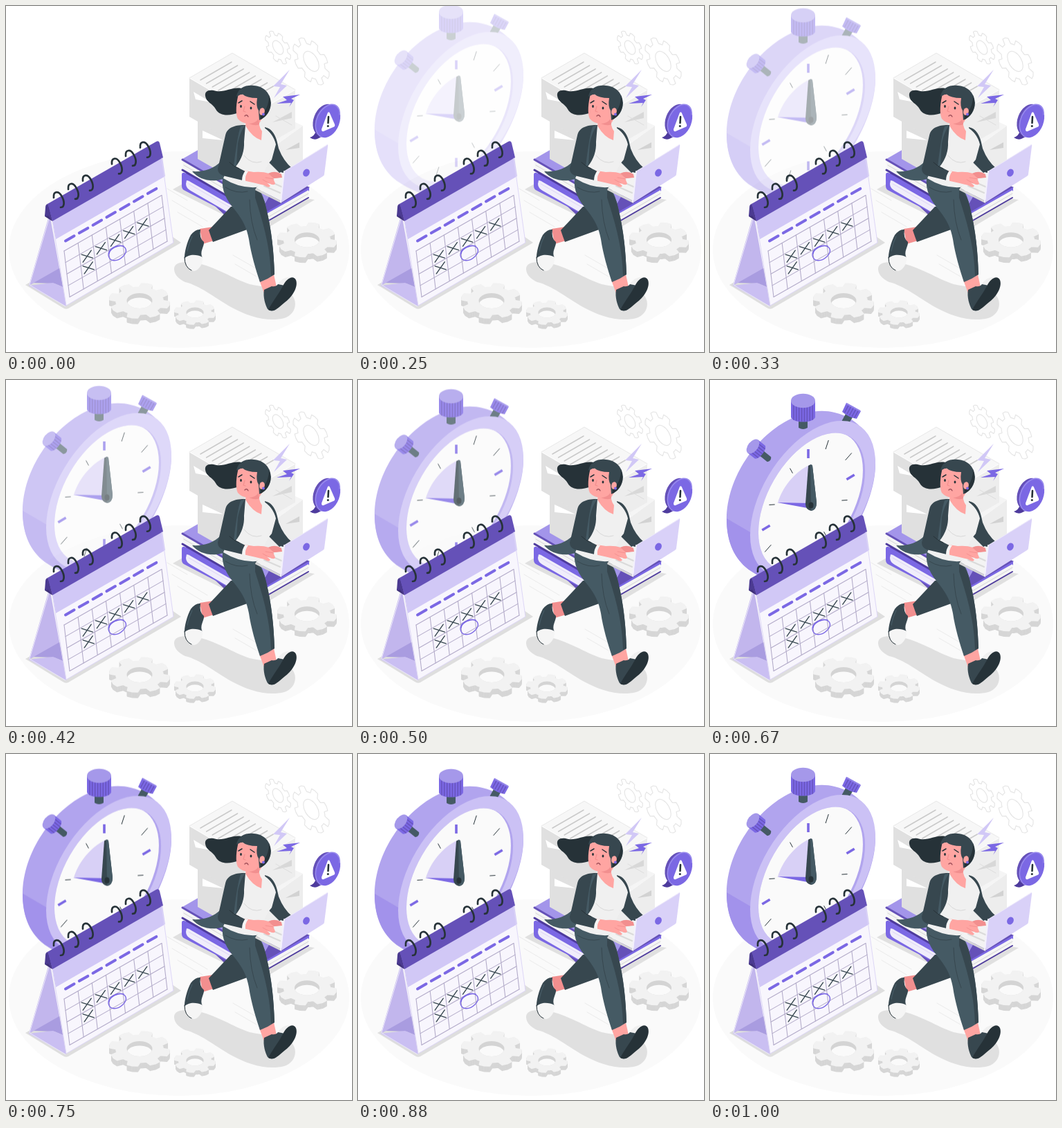
An HTML page with a canvas for the animation above (1.04 s loop, 500 px wide and 500 px high).

```html
<!DOCTYPE html>
<html lang="en">
<head>
<meta charset="utf-8">
<title>Deadline</title>
<style>
html, body { margin: 0; width: 100%; height: 100%; overflow: hidden; background: #fff; }
canvas { display: block; width: 500px; height: 500px; }
</style>
</head>
<body>
<canvas id="stage"></canvas>
<script>
const SIZE = 500, LOOP = 1040;
const DPR = window.devicePixelRatio || 1;
const INK = '#263238', SLATE = '#37474f', STEEL = '#455a64';
const VIOLET = '#7b68e4', DEEP = '#6551b8', LILAC = '#d1c8f6';
const SKIN = '#ffa5a2', BLUSH = '#f28f8f';
let c;

function layer(canvas, draw) {
  canvas.width = canvas.height = SIZE * DPR;
  c = canvas.getContext('2d');
  c.scale(DPR, DPR);
  c.lineCap = c.lineJoin = 'round';
  if (draw) draw();
  return canvas;
}
const makeLayer = draw => layer(document.createElement('canvas'), draw);

function fill(d, color) {
  c.fillStyle = color;
  c.fill(typeof d === 'string' ? new Path2D(d) : d);
}
function line(d, color, w = 1) {
  c.strokeStyle = color;
  c.lineWidth = w;
  c.stroke(typeof d === 'string' ? new Path2D(d) : d);
}
function clipped(shape, draw) {
  c.save();
  c.clip(shape);
  draw();
  c.restore();
}
function oval(x, y, rx, ry = rx, rot = 0) {
  const p = new Path2D();
  p.ellipse(x, y, rx, ry, rot, 0, 7);
  return p;
}
// Circle seen on an upright isometric wall; dir is the slope of the wall.
function wallDisc(x, y, r, dir, tall = 1) {
  const p = new Path2D(), q = new Path2D();
  q.arc(0, 0, r, 0, 7);
  p.addPath(q, new DOMMatrix([.866, .5 * dir, 0, tall, x, y]));
  return p;
}
function gearPath(x, y, m, R, r, n, rot) {
  const p = new Path2D(), s = Math.PI / n;
  for (let i = 0; i < n; i++) {
    for (const [k, q] of [[-.66, r], [-.45, R], [0, R * 1.02], [.45, R], [.66, r], [1, r]]) {
      const a = rot + (2 * i + k) * s;
      const u = q * Math.cos(a), v = q * Math.sin(a);
      p.lineTo(x + m[0] * u + m[2] * v, y + m[1] * u + m[3] * v);
    }
  }
  p.closePath();
  return p;
}
function floorGear(x, y, R, h) {
  const shape = dy => gearPath(x, y + dy, [1, 0, 0, .577], R - 1, R * .77, 8, .24);
  for (let dy = h; dy > 0; dy--) {
    fill(shape(dy), '#d6d6d6');
    line(shape(dy), '#d6d6d6', 2);
  }
  fill(shape(0), '#f2f2f2');
  line(shape(0), '#f2f2f2', 2);
  const hole = oval(x, y, R * .42, R * .25);
  fill(hole, '#d4d4d4');
  clipped(hole, () => fill(oval(x, y + h * .8, R * .42, R * .25), '#fafafa'));
}
function wallGear(x, y, R, hole) {
  line(gearPath(x, y, [.866, .5, 0, 1], R, R * .77, 8, .2), '#e6e6e6', 1.2);
  line(wallDisc(x, y, hole, 1), '#e6e6e6', 1.2);
}

function ground() {
  c.fillStyle = '#fff';
  c.fillRect(0, 0, SIZE, SIZE);
  fill(oval(250, 352, 246, 142), '#fafafa');
  wallGear(393, 60, 21, 9);
  wallGear(441, 80, 30, 13);
  line('M240 281L291 311M248 298L284 319M233 264L262 281M328 360L373 386M331 373L362 391', '#ebebeb');
}

function papers() {
  fill('M241 265L264 252L446 280L374 323Q367 327 357 323Z', '#e0e0e0');
  // lower book
  fill('M254 244L330 213L439 262L369 303L318 304Z', DEEP);
  fill('M254 243Q255 239 260 242L336 285Q361 297 374 299L438 262V267L375 305L372 315L324 301L257 266Q254 264 254 260Z', VIOLET);
  fill('M261 252Q264 252 268 255L331 291V304L267 267Q260 263 260 257Z', '#f0edfb');
  line('M264 257L329 294', '#ddd5f5');
  fill('M370 304L437 266V277L372 315Z', '#f5f5f5');
  line('M372 309L437 271', '#d4d4d4');
  line('M371 315L437 277', '#4e3b9d', 2);
  // upper book
  fill('M255 221L281 206L400 240L372 290Z', '#a395ea');
  fill('M255 222L372 290V299L340 286L256 237Z', '#f5f5f5');
  line('M257 230L350 284', '#d4d4d4');
  line('M255 222L360 283', DEEP, 3);
  line('M255 237L336 284', '#4e3b9d', 3);
  // lower pile
  fill('M277 164L368 217V273L277 221Z', '#e0e0e0');
  fill('M368 217L429 173V230L368 270Z', '#ededed');
  fill('M277 164L338 131L429 173L368 217Z', '#f5f5f5');
  fill('M284 180L314 194L284 191Z', '#fff');
  fill('M424 197L404 208L424 205Z', '#d2d2d2');
  // upper pile
  fill('M265 104L356 157V212L265 160Z', '#e0e0e0');
  fill('M356 157L418 121V177L356 212Z', '#ededed');
  fill('M327 68L418 121L356 157L265 104Z', '#f7f7f7');
  line('M265 104L356 157L418 121', '#fff');
  line('M265 104L327 68L418 121', '#e8e8e8');
  fill('M271 124L296 139L274 135Z', '#fff');
  fill('M413 153L385 168L413 162Z', '#d8d8d8');
  line('M390 159L413 172', '#dedede');
  for (let i = 0; i < 8; i++) {
    const x = 281 + i * 8.6, y = 107 + i * 5;
    line(`M${x} ${y}L${x + 45} ${y - 26}`, '#cacaca', 1.5);
  }
}

function knob(x, y, rot, w, h, ridges, stem) {
  c.save();
  c.translate(x, y);
  c.rotate(rot);
  const b = w * .5;
  fill(`M${-w * .37} ${h}V${stem - 2}Q0 ${stem + 2} ${w * .37} ${stem - 2}V${h}Z`, STEEL);
  fill(`M${-w} 0V${h}C${-w * .8} ${h + b} ${w * .8} ${h + b} ${w} ${h}V0Z`, VIOLET);
  for (let i = 1; i < ridges; i++) {
    const u = -1 + 2 * i / ridges, sag = Math.sqrt(1 - u * u) * b;
    line(`M${u * w} ${sag}V${h + sag * .7}`, DEEP, 1.3);
  }
  fill(oval(0, 0, w, w * .59), '#a598ea');
  c.restore();
}

function stopwatch() {
  fill('M24 202C24 140 68 79 117 56C138 45 162 42 180 47C216 55 239 86 239 122C239 185 180 286 110 296Q85 294 56 274C36 259 24 235 24 202Z', '#b1a4ee');
  fill('M24 200L60 221L100 294Q78 289 56 274C36 259 24 235 24 200Z', '#a292eb');
  c.lineCap = 'butt';
  knob(62, 96, -.9, 12, 13, 6, 32);
  fill('M196 49L206 54L200 64Q194 65 190 60Z', STEEL);
  fill('M197 33L218 45L212 56Q200 54 191 46Z', VIOLET);
  for (let i = 1; i < 6; i++) {
    const x = 197 + i * 3.5, y = 34 + i * 2;
    line(`M${x} ${y}l-6 11`, DEEP, 1.3);
  }
  line('M197 34L217 45', '#9283e8', 2);

  fill(wallDisc(148.5, 172, 104.5, -1, .96), '#cbc1f5');
  const rim = wallDisc(147, 176, 89, -1);
  fill(rim, '#b1a4ee');
  clipped(rim, () => fill(wallDisc(143, 175.5, 90, -1), '#fafafa'));
  for (let i = 0; i < 12; i++) {
    const major = i % 3 === 0, hour = i * Math.PI / 6;
    const a = hour - .1 * Math.sin(4 * hour), k = 1 + .06 * Math.sin(2 * hour);
    const at = r => `${142 + .866 * r * k * Math.sin(a)} ${177 - r * k * (.52 * Math.sin(a) + Math.cos(a))}`;
    line(`M${at(major ? 64 : 65)}L${at(major ? 77 : 76)}`, major ? VIOLET : INK, major ? 3.6 : 1);
  }
  c.lineCap = 'round';
  fill('M146 181L98 177C104 157 120 134 145 122Z', '#d8d0f6');
  fill('M97 177L144 178L146 186Z', VIOLET);
  fill('M142 124Q145 121 148 124L154 177Q154 188 146 189Q138 187 138 179Z', SLATE);
  fill('M145 122Q148 122 148 124L154 177Q154 188 146 189Z', STEEL);
  fill(oval(146, 181, 3.5, 4.5), INK);
  c.lineCap = 'butt';
  knob(134.5, 30, 0, 17.5, 24, 9, 41);
  c.lineCap = 'round';
}

function calendar() {
  fill('M28 403L66 382L240 333L253 342L90 437Q86 439 82 436Z', '#dedede');
  fill('M63 300L33 404L76 381L87 434Z', '#c2b6ed');
  fill('M40 400L77 379L82 406L70 401Z', '#a99ce0');
  fill('M33 404L68 400L82 406L87 434Z', '#cabff2');
  line('M64 301L34 403L86 434', '#ece8fb');
  fill('M61 285L56 304L67 311Z', '#3f3178');
  fill('M67 310L225 219L242 342L87 433Z', '#f8f6fd');
  fill('M67 310L226 219L230 246L72 337Z', LILAC);
  fill('M60 286L217 196Q221 194 222 198L227 219L67 311Z', DEEP);
  fill('M60 286Q57 287 57 291L56 304L61 303L67 311Z', '#4b3a91');
  line('M67 311L87 433L242 342L225 220', '#ddd6f6', 1);

  const at = (u, v) => [84 + 141 * u + 8 * v, 354 - 80.5 * u + 66.5 * v];
  const seg = (a, b) => `M${at(...a)}L${at(...b)}`;
  for (let i = 0; i <= 7; i++) line(seg([i / 7, 0], [i / 7, 1]), '#b3abc9', 1.1);
  for (let i = 0; i <= 4; i++) line(seg([0, i / 4], [1, i / 4]), '#b3abc9', 1.1);
  for (let i = 0; i < 7; i++) line(`M${86 + i * 19.8} ${339.5 - i * 11.4}l12.5 -7.2`, VIOLET, 4);
  for (const [col, row] of [[1, 1], [2, 1], [3, 1], [4, 1], [5, 1], [1, 2]]) {
    const [x, y] = at((col + .5) / 7, (row + .5) / 4);
    line(`M${x - 8} ${y - 2.5}L${x + 8} ${y + 2.5}M${x - 6} ${y + 8.5}L${x + 6} ${y - 8.5}`, SLATE, 1.4);
  }
  line('M170 347C159 344 148 351 148 360C149 370 161 370 169 362C178 353 172 345 162 347C154 349 149 354 149 358', VIOLET, 1.4);
  for (const x of [75, 96, 117, 159, 179, 200]) {
    c.save();
    c.translate(x, 281 - (x - 75) * .578);
    line('M-6 -4C-7 -14 1 -14 5 -7C10 1 10 10 4 10', INK, 2.7);
    c.restore();
  }
}

function badge() {
  fill('M448 180Q446 188 439 190Q446 195 452 191L460 187Z', '#4e3b9d');
  fill(oval(461, 165, 16.5, 24, .36), DEEP);
  fill(oval(465, 166, 17, 25, .36), VIOLET);
  line('M455 189C441 180 447 151 467 143C477 140 483 147 482 157', '#988aec', 1.5);
  fill('M465 154Q467 152 468 155L475 171Q476 174 473 175L459 181Q456 182 456 178Z', '#fff');
  line('M466 160L465.5 169', INK, 2.6);
  fill(oval(465.3, 173.5, 1.5), INK);
  fill('M410 92L386 116L396 117L387 133L406 115L397 113Z', LILAC);
  fill('M425 128L400 131L406 136L391 141L412 140L409 146L416 136L412 134Z', VIOLET);
}

function legs() {
  fill('M243 381C242 371 254 368 273 371C302 376 330 395 352 402C372 407 392 405 406 412C423 420 422 445 402 451C378 457 350 449 325 435C299 420 280 404 259 399Q244 392 243 381Z', '#e0e0e0');
  // rear leg
  fill('M280 322L300 319L304 338L284 344Z', BLUSH);
  fill('M325 290L293 324Q296 333 299 341L354 321L352 290Z', SLATE);
  fill('M281 323Q274 322 267 331C262 340 257 357 258 368C260 378 268 383 276 380L284 364C279 355 287 347 286 341Q279 336 281 323Z', SLATE);
  fill('M258 365C264 358 276 359 284 363C285 373 278 383 271 383C264 382 258 374 258 365Z', '#f5f5f5');
  line('M258 363Q258 378 268 382', INK, 1);
  line('M269 333Q264 343 262 354', STEEL, 1.3);
  // front leg
  fill('M366 396L387 388L391 406L373 415Z', SKIN);
  fill('M313 249C311 267 319 281 331 295C343 310 348 321 351 337C354 358 361 381 367 399Q378 395 388 388C387 355 384 325 376 292Q373 275 362 257Z', STEEL);
  fill('M360 260Q373 275 376 292C384 325 387 355 388 388L383 390C382 352 374 320 360 277Z', SLATE);
  line('M317 262Q333 272 349 268M352 280Q353 314 363 338', SLATE, 1);
  fill('M373 410C371 421 375 432 378 438Q384 443 391 438L409 398L393 402Q390 406 384 405Z', SLATE);
  fill('M393 402C398 393 407 391 413 392Q406 397 403 404Z', '#f0f0f0');
  fill('M419 396C423 407 412 422 402 429C394 436 387 443 379 439C386 426 394 416 400 405C405 394 415 388 419 396Z', INK);
}

function torso() {
  // coat tail and far arm
  fill('M311 224C300 236 284 240 269 239Q282 254 305 252L329 247L322 224Z', STEEL);
  fill('M374 175C387 178 391 190 394 206Q401 224 413 234L397 243L380 226Z', SLATE);
  fill('M345 170L370 174Q386 183 390 200L384 222Q370 237 370 261Q341 266 314 249L334 201Z', '#f0f0f0');
  fill('M348 160L366 160Q364 173 370 181L369 194Q356 190 346 173Z', SKIN);
  line('M344 216Q355 230 369 225', '#d8d8d8', 1);
  fill('M346 172C333 172 320 174 317 187C313 204 309 224 306 235Q306 242 313 245L342 252L346 239L332 232Q345 216 344 196Z', SLATE);
  fill('M346 172Q339 180 335 198L333 230L329 232Q334 189 339 174Z', STEEL);
  line('M323 226Q329 232 337 235', INK, 1);
  // laptop
  fill('M361 263L397 240L416 246L398 282Z', '#f3f3f3');
  fill('M361 263L398 282V285L360 266Z', '#d6d6d6');
  line('M373 260L396 270M382 254L400 262', '#dadada', 2);
  fill('M402 239L463 201Q466 199 465 203L460 243Q460 245 458 246L398 284Z', '#d9d1f8');
  line('M402 239L397 283', '#f3f0fd', 2);
  line('M402 239L464 201', '#eeeafb', 1);
  fill(oval(434, 241, 4.6, 5.8, .5), VIOLET);
  // hands
  fill('M345 238L358 240Q371 239 380 242Q392 239 398 246Q395 249 386 249L388 254Q391 259 384 258L377 255L382 260Q380 264 373 259Q361 256 343 252Z', SKIN);
  fill('M379 242Q389 237 398 243L399 248L387 249Z', BLUSH);
  fill('M346 238L350 239Q345 245 346 253L341 252Q341 244 346 238Z', '#f5f5f5');
  line('M375 248L387 250M371 251L380 256', BLUSH, .9);
}

function head() {
  fill('M343 120C330 115 318 125 304 123C293 120 287 123 288 130C289 139 299 141 303 149C309 160 324 159 336 154L340 136Z', INK);
  fill('M336 127C333 139 331 155 335 163Q341 170 351 170L365 171L373 158L369 133Z', SKIN);
  fill('M351 170Q360 170 365 163L366 171Q361 174 351 170Z', BLUSH);
  fill('M333 131C335 118 346 114 358 115C373 116 382 126 383 140C383 151 376 161 366 165L365 151Q361 145 363 133Q348 133 341 127Q337 129 333 131Z', SLATE);
  fill('M380 129C385 143 381 158 368 164L368 157Q380 149 380 129Z', INK);
  fill(oval(370, 152.5, 3.8, 5.4, .2), SKIN);
  fill(oval(372, 156.5, 2), VIOLET);
  fill(oval(339.5, 145, 1.4, 2), INK);
  fill(oval(354, 147.5, 1.4, 2), INK);
  line('M336 140L341 137M353 138L359 142', INK, 1.5);
  line('M345 145L343 152L346 153', BLUSH, 1.2);
  line('M345 159Q348 156 350 160', '#9d4d58', 1.3);
}

function foreground() {
  calendar();
  floorGear(193, 426, 44, 8);
  floorGear(273, 443, 30, 6);
  floorGear(435, 338, 43, 8);
  badge();
  legs();
  torso();
  head();
}

// Eased progress on the curve (.36, -.01, .5, 1.38).
function ease(t) {
  const cubic = (a, b, s) => 3 * a * s * (1 - s) ** 2 + 3 * b * s * s * (1 - s) + s ** 3;
  let lo = 0, hi = 1;
  for (let i = 0; i < 24; i++) {
    const mid = (lo + hi) / 2;
    if (cubic(.36, .5, mid) < t) lo = mid; else hi = mid;
  }
  return cubic(-.01, 1.38, lo);
}

const back = makeLayer(() => { ground(); papers(); });
const watch = makeLayer(stopwatch);
const front = makeLayer(foreground);
const stage = layer(document.getElementById('stage'));
const out = stage.getContext('2d');
const start = performance.now();

function render(now) {
  const ms = Math.max(0, now - start) % LOOP;
  const step = Math.min(24, Math.floor((ms + 4) * .024));
  out.globalAlpha = 1;
  out.drawImage(back, 0, 0, SIZE, SIZE);
  if (step > 1) {
    const p = ease((step + 1) / 25);
    out.globalAlpha = Math.min(1, Math.max(0, p));
    out.drawImage(watch, 0, 30 * (p - 1), SIZE, SIZE);
    out.globalAlpha = 1;
  }
  out.drawImage(front, 0, 0, SIZE, SIZE);
  requestAnimationFrame(render);
}
render(start);
</script>
</body>
</html>
```
